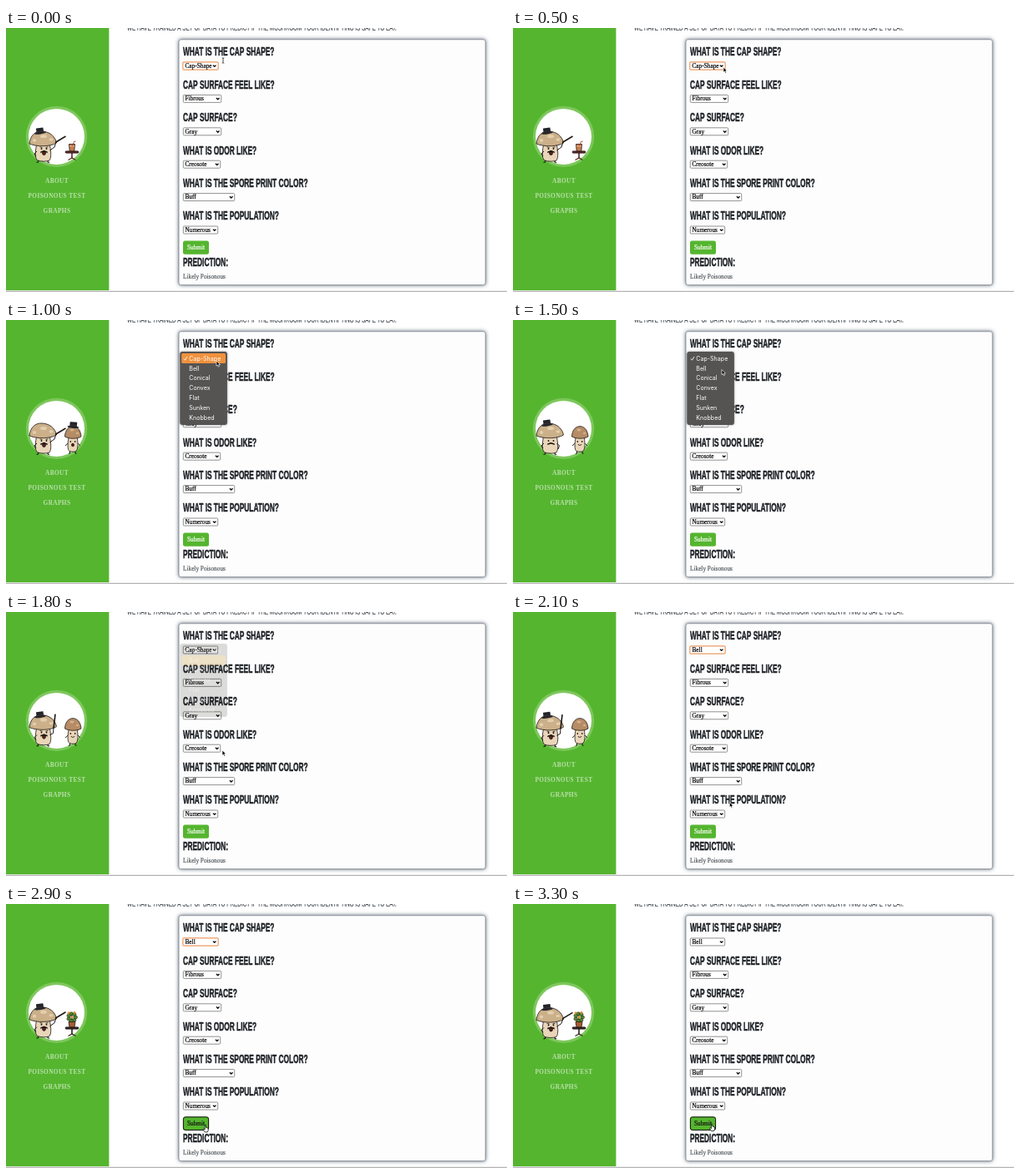
An HTML page with a canvas for the animation above (3.4 s loop, 600 px wide and 317 px high).

```html
<!DOCTYPE html>
<html lang="en">
<head>
<meta charset="utf-8">
<title>Mushroom form</title>
<style>
html, body { margin: 0; width: 600px; height: 317px; overflow: hidden; background: #fff; }
canvas { display: block; width: 600px; height: 317px; }
</style>
</head>
<body>
<canvas id="stage"></canvas>
<script>
const canvas = document.getElementById('stage');
const ctx = canvas.getContext('2d');
const ratio = window.devicePixelRatio || 1;
canvas.width = 600 * ratio;
canvas.height = 317 * ratio;

const LOOP = 3400, STEP = 100;
const GREEN = '#55b52f', INK = '#212529', DARK = '#1d1715';
const SERIF = '"Liberation Serif", serif';
const SANS = '"Liberation Sans", sans-serif';
const MENU_FONT = '7.1px Inter, sans-serif';
const CONDENSED = 0.544; // one narrow face for all headings

const questions = [
  ['WHAT IS THE CAP SHAPE?', 'Cap-Shape', 42],
  ['CAP SURFACE FEEL LIKE?', 'Fibrous', 46],
  ['CAP SURFACE?', 'Gray', 46],
  ['WHAT IS ODOR LIKE?', 'Creosote', 45],
  ['WHAT IS THE SPORE PRINT COLOR?', 'Buff', 62],
  ['WHAT IS THE POPULATION?', 'Numerous', 42]
];
const options = ['Cap-Shape', 'Bell', 'Conical', 'Convex', 'Flat', 'Sunken', 'Knobbed'];

// time, x, y
const path = [
  [0, 260, 39], [200, 259, 40], [500, 252, 47], [1000, 252, 49],
  [1500, 250, 59.5], [1600, 251, 64], [1800, 259, 166], [2000, 266, 205],
  [2300, 246, 275], [2500, 240, 272], [2600, 239, 271], [2800, 239, 267],
  [3400, 238, 265]
];

// weight adds a fine outline to thicken the letters
function text(str, x, y, font, color, weight = 0, align = 'left') {
  ctx.font = font;
  ctx.fillStyle = ctx.strokeStyle = color;
  ctx.textAlign = align;
  ctx.fillText(str, x, y);
  if (weight) {
    ctx.lineWidth = weight;
    ctx.strokeText(str, x, y);
  }
}

function narrow(str, x, y, font, color, weight) {
  ctx.save();
  ctx.translate(x, y);
  ctx.scale(CONDENSED, 1);
  text(str, 0, 0, font, color, weight);
  ctx.restore();
}

const heading = (str, y) => narrow(str, 212, y, 'bold 15.3px ' + SANS, INK, 0.6);
const small = (str, x, y, color) => text(str, x, y, '7.3px ' + SERIF, color, 0.2);

function box(x, y, w, h, r, fill, stroke, width = 1) {
  ctx.beginPath();
  ctx.roundRect(x, y, w, h, r);
  paint(fill, stroke, width);
}

function oval(x, y, rx, ry, fill, stroke, width = 0.8, from = 0, to = Math.PI * 2) {
  ctx.beginPath();
  ctx.ellipse(x, y, rx, ry, 0, from, to);
  paint(fill, stroke, width);
}

function line(points, stroke, width = 1) {
  trace(points);
  paint(null, stroke, width);
}

function shape(points, fill, stroke, width = 0.8) {
  trace(points);
  ctx.closePath();
  paint(fill, stroke, width);
}

function trace(points) {
  ctx.beginPath();
  for (let i = 0; i < points.length; i += 2) ctx.lineTo(points[i], points[i + 1]);
}

function paint(fill, stroke, width) {
  if (fill) { ctx.fillStyle = fill; ctx.fill(); }
  if (stroke) { ctx.strokeStyle = stroke; ctx.lineWidth = width; ctx.stroke(); }
}

function hat(x, y, tilt) {
  ctx.save();
  ctx.translate(x, y);
  ctx.rotate(tilt);
  box(-4.3, -6, 8.6, 6, 0.5, '#22252b');
  box(-4.3, -2, 8.6, 1.2, 0, '#53352f');
  oval(0, 0, 7, 1.4, '#22252b');
  ctx.restore();
}

function face(x, y, upset) {
  oval(x - 3, y, 0.9, 1.1, DARK);
  oval(x + 3, y, 0.9, 1.1, DARK);
  if (upset) {
    line([x - 5, y - 2.2, x - 2, y - 1.4], DARK, 0.8);
    line([x + 5, y - 2.2, x + 2, y - 1.4], DARK, 0.8);
    oval(x, y + 5, 2, 2.6, '#571f1b', DARK);
  }
  shape([x, y + 2, x + 4, y + 3.2, x + 4.5, y + 5, x, y + 3.7, x - 4.5, y + 5, x - 4, y + 3.2], DARK);
}

function bigMushroom(pose, bob) {
  ctx.save();
  ctx.translate(0, bob);
  line([39, 156, 38.5, 161, 36.5, 161.4], DARK, 1.2);
  line([50, 156, 50, 161, 52, 161.4], DARK, 1.2);
  ctx.beginPath();
  ctx.moveTo(37, 138);
  ctx.bezierCurveTo(35, 147, 34, 157, 38, 159);
  ctx.bezierCurveTo(42, 160.5, 49, 160.5, 52, 159);
  ctx.bezierCurveTo(55, 155, 53.5, 146, 52, 138);
  paint('#e9d5b8', DARK, 0.8);
  ctx.beginPath();
  ctx.moveTo(28, 139);
  ctx.bezierCurveTo(29, 129, 35, 124, 42, 124);
  ctx.bezierCurveTo(52, 124, 59, 130, 60.5, 138);
  ctx.bezierCurveTo(54, 142.5, 37, 143, 28, 139);
  paint('#cbb089', DARK, 0.8);
  oval(45, 130, 4, 2, '#e3cfae');
  oval(54, 134, 2.4, 1.7, '#e3cfae');
  oval(34, 135, 2.2, 2, '#e3cfae');
  face(45.5, 145, pose !== 'calm');
  line([37, 148, 34, 151, 36, 154], DARK, 1);
  if (pose === 'point') {
    line([52.5, 147, 58, 143, 60, 137], DARK, 1);
    line([59, 137.5, 71.5, 130], DARK, 1.5);
  } else if (pose === 'raise') {
    line([52.5, 148, 56.5, 146, 57, 139], DARK, 1);
    line([57, 140, 59, 123], DARK, 1.6);
  } else {
    line([52.5, 148, 55.5, 151, 54, 155], DARK, 1);
  }
  ctx.restore();
}

function smallMushroom(upset) {
  line([76.5, 156, 76.5, 160, 75, 160.4], DARK, 1);
  line([83, 156, 83, 160, 84.5, 160.4], DARK, 1);
  ctx.beginPath();
  ctx.moveTo(75.5, 139);
  ctx.bezierCurveTo(73.5, 148, 73.5, 156, 76, 157.5);
  ctx.bezierCurveTo(79, 158.5, 82, 158.5, 84, 157.5);
  ctx.bezierCurveTo(87, 154, 86, 146, 85, 139);
  paint('#e9d5b8', DARK, 0.8);
  ctx.beginPath();
  ctx.moveTo(70.5, 140);
  ctx.bezierCurveTo(71, 123.5, 89, 123.5, 90, 140);
  ctx.bezierCurveTo(85, 143, 76, 143, 70.5, 140);
  paint('#b58c65', DARK, 0.8);
  oval(79, 132, 2.6, 1.5, '#d3b28b');
  oval(85.5, 136, 1.7, 1.3, '#d3b28b');
  oval(77.3, 146, 0.8, 1, DARK);
  oval(82.7, 146, 0.8, 1, DARK);
  if (upset) oval(80, 150, 1.5, 1.8, '#571f1b', DARK);
  else oval(80, 149, 1.9, 1.4, null, DARK, 0.8, 0, Math.PI);
  line([74.2, 148, 71, 151], DARK, 0.9);
  line([86, 148, 89, 151], DARK, 0.9);
}

function table(y, color) {
  line([79, y, 79, 157], color, 1.6);
  line([74.5, 158.5, 79, 156, 83.5, 158.5], color, 1.3);
  box(71, y - 1.2, 16, 2.4, 1.1, color, DARK, 0.6);
}

const props = {
  drink() {
    table(149, '#5b2525');
    shape([75.5, 139.5, 82.5, 139.5, 81.8, 147.8, 76.2, 147.8], '#c77b4e', DARK);
    line([79, 143, 81.5, 136.5, 83.5, 136], '#a03a25', 0.9);
    line([76, 142, 82, 142], '#ecc29a', 0.9);
  },
  cake() {
    table(149.5, '#30221f');
    box(70.5, 140.5, 16, 7.8, 1.2, '#fbf3e7', DARK, 0.8);
    line([71, 144.8, 86, 144.8], '#5b3a2c', 1.4);
    oval(78.5, 140.5, 7.8, 1.6, '#fffaf2', DARK, 0.7);
    oval(78.5, 139.5, 1.1, 1.1, '#8e3a2c');
  },
  plant() {
    table(149, '#33211e');
    line([79, 143, 78.5, 132], '#397a29', 1.6);
    for (let i = 0; i < 7; i++) {
      const a = i * 0.9;
      oval(79 + 4.2 * Math.cos(a), 136 + 4.4 * Math.sin(a), 2.4, 1.9, '#4f8b2e', DARK, 0.5);
    }
    for (const [x, y] of [[75, 131], [82, 130.5], [79, 136]]) oval(x, y, 1.5, 1.4, '#dc8a30');
    shape([75, 141.5, 83, 141.5, 82, 147.8, 76, 147.8], '#a75d31', DARK);
  }
};

function avatar(t) {
  oval(60.5, 130.4, 36.7, 36.7, '#7dc75c');
  oval(60.5, 130.4, 33.5, 33.5, '#fff');
  const pair = t >= 700 && t < 2200;
  const calm = t >= 1200 && t < 1700;
  const raised = t >= 1700 && t < 2900;
  const pose = calm ? 'calm' : raised ? 'raise' : 'point';
  const bob = calm ? 0 : 0.4 * Math.sin(t / 160);
  const swapped = pair && t < 1200;
  bigMushroom(pose, bob);
  if (!swapped) hat(41, 126 + bob, -0.14);
  if (pair) {
    smallMushroom(swapped);
    if (swapped) hat(80.5, 128.5, 0.08);
  } else {
    props[t < 700 ? 'drink' : t < 2900 ? 'cake' : 'plant']();
  }
}

function sidebar(t) {
  ctx.fillStyle = GREEN;
  ctx.fillRect(0, 0, 123.4, 315);
  avatar(t);
  ctx.letterSpacing = '0.4px';
  ['ABOUT', 'POISONOUS TEST', 'GRAPHS'].forEach((label, i) =>
    text(label, 61, 186 + i * 18.2, 'bold 7.3px ' + SERIF, '#bbe1ac', 0, 'center'));
  ctx.letterSpacing = '0px';
}

function select(value, y, w, focus) {
  if (focus) box(211.8, y - 4.7, w + 0.4, 9.4, 1.5, '#fff', '#eb9a63', 1.2);
  else box(212.3, y - 4.5, w - 0.6, 9, 1, '#fff', '#777', 0.8);
  small(value, 214.5, y + 2.3, '#000');
  const x = 212 + w - 4.3;
  line([x - 1.8, y - 0.9, x, y + 0.9, x + 1.8, y - 0.9], '#000', 1.3);
}

function card(t) {
  narrow('WE HAVE TRAINED A SET OF DATA TO PREDICT IF THE MUSHROOM YOUR IDENTIFYING IS SAFE TO EAT.',
    145, 3.2, '11.7px ' + SANS, '#444a50', 0.2);
  ctx.save();
  ctx.shadowColor = 'rgba(50,64,82,.9)';
  ctx.shadowBlur = 5 * ratio;
  box(207, 13.8, 367.2, 294.8, 2.5, '#fdfdfd');
  ctx.restore();
  box(207, 13.8, 367.2, 294.8, 2.5, null, '#7b838d', 0.8);

  const picked = t >= 1900;
  questions.forEach(([title, value, w], i) => {
    const y = 28 + i * 39.4;
    heading(title, y + 5.4);
    const focus = i === 0 && (t < 1600 || (picked && t < 3100));
    select(i === 0 && picked ? 'Bell' : value, y + 17.5, w, focus);
  });

  const hover = t >= 2800;
  box(212, 255.4, 31, 16.4, 2.5, GREEN);
  if (hover) box(212.4, 255.8, 30.2, 15.6, 2.5, null, '#111', 1);
  small('Submit', 217, 266, hover ? '#111' : '#fff');
  heading('PREDICTION:', 286.4);
  small('Likely Poisonous', 212, 300.8, '#555b60');
}

function menu(t) {
  if (t < 700 || t >= 1900) return;
  const fade = t >= 1800 ? 0.2 : t >= 1700 ? 0.6 : 1;
  const fading = fade < 1;
  // the chosen row blinks off once after the click
  const active = t < 1300 ? 0 : t === 1500 ? -1 : 1;
  ctx.save();
  ctx.save();
  ctx.globalAlpha = fade;
  // the page keeps its dark text while the panel thins out
  if (fading) ctx.globalCompositeOperation = 'multiply';
  else {
    ctx.shadowColor = 'rgba(0,0,0,.4)';
    ctx.shadowBlur = 3 * ratio;
  }
  box(208.3, 38, 56.6, 88, 3, '#565452');
  ctx.restore();
  ctx.globalAlpha = fading ? 0.5 : 1;
  if (active >= 0) box(210.2, 40.1 + active * 11.93, 52.8, 12, 1.5, fading ? '#ffe7b4' : '#f1913d');
  options.forEach((name, i) => text(name, 219.3, 48.6 + i * 11.93, MENU_FONT, '#fff'));
  line([213, 46.4, 214.4, 48.2, 217, 44], '#fff', 0.9);
  ctx.restore();
}

function place(t) {
  let i = 0;
  while (i < path.length - 2 && path[i + 1][0] <= t) i++;
  const [t0, x0, y0] = path[i], [t1, x1, y1] = path[i + 1];
  const k = (t - t0) / (t1 - t0);
  return [x0 + (x1 - x0) * k, y0 + (y1 - y0) * k];
}

function cursor(t) {
  const [x, y] = place(t);
  ctx.save();
  ctx.translate(x, y);
  if (t < 300 || (t >= 2400 && t < 2800)) {
    line([-1.3, -3.2, 0, -2.7, 1.3, -3.2], '#222', 0.8);
    line([0, -2.7, 0, 2.7], '#222', 0.8);
    line([-1.3, 3.2, 0, 2.7, 1.3, 3.2], '#222', 0.8);
  } else if (t >= 2800) {
    shape([-0.7, -1.5, 0.5, -1.5, 0.7, 1.7, 3.3, 2.5, 3.4, 5, 2.4, 7.2, -0.8, 7.2, -2.8, 4, -2, 3.3, -0.7, 4.4],
      '#fff', '#111', 0.8);
  } else {
    shape([0, 0, 0, 6.2, 1.4, 5, 2.4, 7.2, 3.5, 6.7, 2.6, 4.6, 4.4, 4.5], '#000', '#fff', 0.7);
  }
  ctx.restore();
}

function draw(t) {
  ctx.setTransform(ratio, 0, 0, ratio, 0, 0);
  ctx.fillStyle = '#fff';
  ctx.fillRect(0, 0, 600, 317);
  ctx.lineJoin = 'round';
  card(t);
  sidebar(t);
  ctx.fillStyle = '#e9e9e9';
  ctx.fillRect(0, 315, 600, 1);
  ctx.fillStyle = '#b4b4b4';
  ctx.fillRect(0, 316, 600, 1);
  menu(t);
  cursor(t);
}

const start = performance.now();
function tick() {
  const t = (performance.now() - start) % LOOP;
  draw(Math.floor(t / STEP) * STEP);
  requestAnimationFrame(tick);
}
tick();
</script>
</body>
</html>
```
